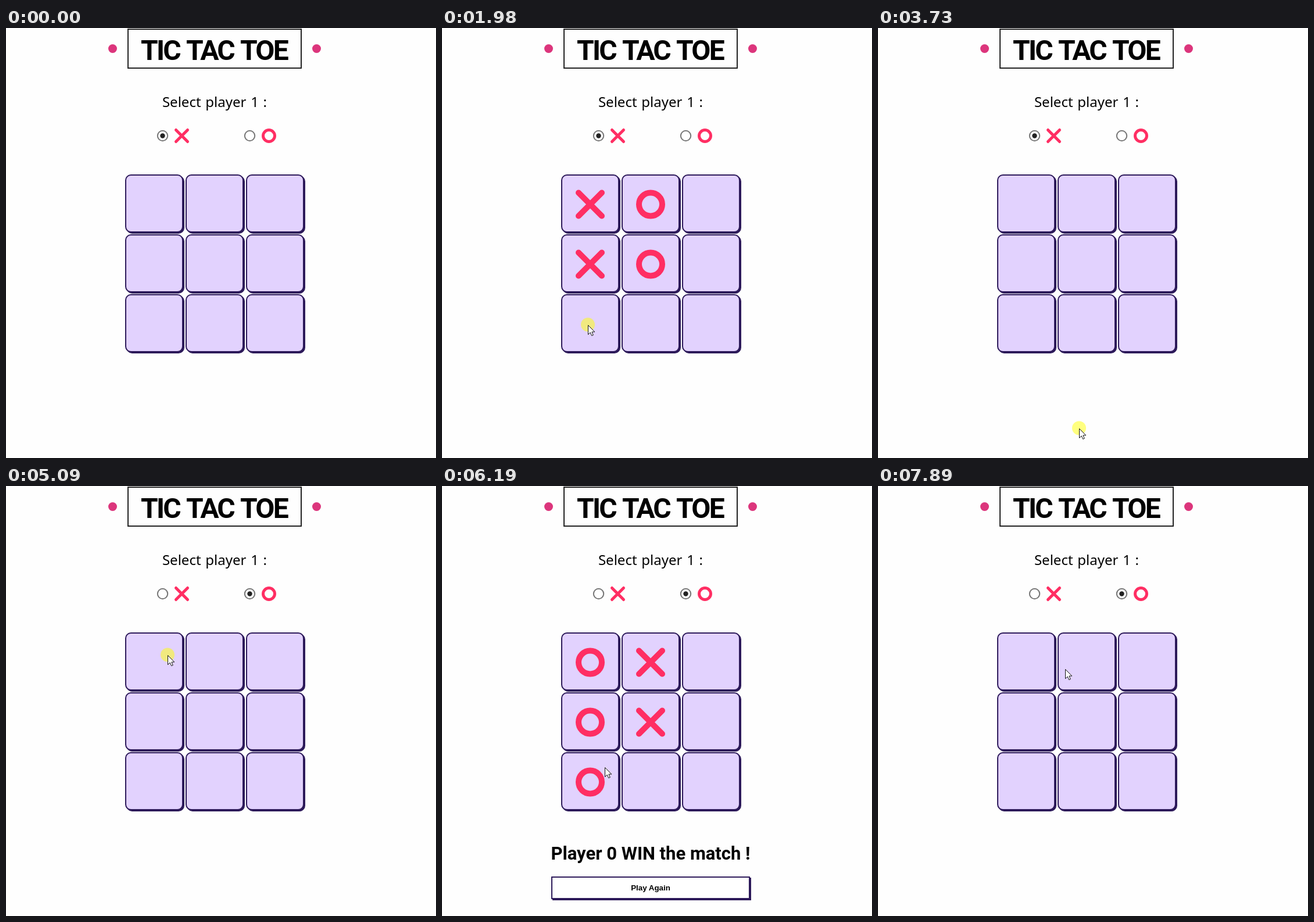
These frames come from a looping animation (740 px wide and 740 px high, 8 s). An HTML page:

```html
<!DOCTYPE html>
<html lang="en">
<head>
<meta charset="utf-8">
<title>Tic Tac Toe</title>
<style>
  html, body { margin: 0; height: 100%; overflow: hidden; background: #fefefe; }
  svg { display: block; width: 100vw; height: 100vh; }
  text { text-anchor: middle; }
  .title { font: 700 48px Roboto, sans-serif; letter-spacing: -2.8px; word-spacing: 3.5px; }
  .prompt { font: 500 24px "Noto Sans", sans-serif; word-spacing: 1.5px; }
  .result { font: 700 31px Roboto, sans-serif; }
  .again { font: 700 13.333px "Liberation Sans", Arial, sans-serif; }
  .mark { fill: none; stroke: #ff2e63; stroke-width: 10; stroke-linecap: round; }
  .cell, .shade, .button { stroke: #2d1a5a; stroke-width: 2; }
  .cell, .button.hover { fill: #e2d2fe; }
  .shade { fill: #2d1a5a; }
  .button { fill: #fff; }
  .radio { fill: #fff; stroke: #767676; stroke-width: 2; }
</style>
</head>
<body>
<svg viewBox="0 0 740 740">
  <defs>
    <path id="X" class="mark" d="M-20-20 20 20M20-20-20 20"/>
    <circle id="O" class="mark" r="20"/>
    <g id="tile">
      <rect class="shade" x="3" y="3" width="98" height="98" rx="9"/>
      <rect class="cell" x="1" y="1" width="98" height="98" rx="9"/>
    </g>
  </defs>

  <rect x="210" y="2" width="298" height="67" fill="none" stroke="#222" stroke-width="2"/>
  <g fill="#dc357c">
    <circle cx="183.5" cy="35.5" r="7.5"/>
    <circle cx="534.5" cy="35.5" r="7.5"/>
  </g>
  <text class="title" x="358" y="55">TIC TAC TOE</text>
  <text class="prompt" x="359" y="136">Select player 1 :</text>

  <circle class="radio" cx="269.5" cy="185.5" r="8.7"/>
  <circle class="radio" cx="419.5" cy="185.5" r="8.7"/>
  <circle id="choice" cy="185.5" r="4.2" fill="#222"/>
  <use href="#X" transform="translate(302.5 185.5) scale(.5)"/>
  <use href="#O" transform="translate(452.5 185.5) scale(.5)"/>

  <g id="board"></g>

  <g id="outcome">
    <text id="result" class="result" x="359" y="643"></text>
    <rect class="shade" x="191" y="675" width="340" height="37"/>
    <rect id="button" class="button" x="189" y="673" width="340" height="37"/>
    <text class="again" x="359" y="696">Play Again</text>
  </g>

  <g id="cursor">
    <circle id="press" cy="-.5" r="12" fill="#ff0" fill-opacity=".5"/>
    <path d="M.5.5V16.5L4.2 13 6.7 18.5 9.3 17.4 6.9 12H11.8Z" fill="#fff" stroke="#111"/>
  </g>
</svg>
<script>
  const LOOP = 8000, ENTER = 70, PRESS = 70;
  const $ = id => document.getElementById(id);
  const show = (el, on) => el.setAttribute("visibility", on ? "visible" : "hidden");
  const mix = (a, b, p) => a + (b - a) * p;
  const smooth = p => p * p * (3 - 2 * p);
  const easeOut = p => 1 - (1 - p) ** 3;

  const board = $("board");
  function place(shape, col, row, dx = 0, dy = dx) {
    const el = document.createElementNS("http://www.w3.org/2000/svg", "use");
    el.setAttribute("href", "#" + shape);
    el.setAttribute("transform", `translate(${205 + col * 104 + dx} ${252 + row * 103 + dy})`);
    return board.appendChild(el);
  }
  for (let i = 0; i < 9; i++) place("tile", i % 3, Math.floor(i / 3));

  const stops = [], clicks = [], marks = [];

  function rest(from, to, x, y) {
    stops.push({ from, to, x, y });
  }
  function click(t, x, y) {
    clicks.push(t);
    rest(t, t + PRESS, x, y);
  }

  // Five moves at an even pace zigzag down the first two columns
  function play({ players, top, bottom, reach, start, win, reset }) {
    for (let i = 0; i < 5; i++) {
      const col = i % 2, row = (i - col) / 2;
      const from = mix(start, win, i / 4);
      click(from - PRESS,
        mix(top[0], bottom[0], row / 2) + col * reach[0],
        mix(top[1], bottom[1], row / 2) + col * reach[1]);
      marks.push({ from, to: reset, el: place(players[col], col, row, 50, 51.5) });
    }
  }

  const games = [
    { players: "XO", winner: 1, top: [262, 300], bottom: [251, 511], reach: [88, 8],
      start: 810, win: 2050, reset: 3730 },
    { players: "OX", winner: 0, top: [278, 291], bottom: [280, 483], reach: [67, 18],
      start: 5160, win: 6190, reset: 7070 }
  ];
  const switchTime = 4540;

  rest(ENTER, ENTER, 655, 732);
  play(games[0]);
  rest(2190, 2460, 300, 603);
  rest(2730, games[0].reset, 346, 689);
  click(games[0].reset, 346, 689);
  click(switchTime, 418, 187);
  play(games[1]);
  rest(6810, games[1].reset, 340, 689);
  click(games[1].reset, 340, 689);
  rest(7480, 7680, 281, 194);
  rest(7890, LOOP, 322, 315);

  function cursorAt(t) {
    const i = Math.max(0, stops.findIndex(s => t <= s.to));
    const b = stops[i], a = stops[i - 1] || b;
    if (t >= b.from || a === b) return [b.x, b.y];
    const p = (t - a.to) / (b.from - a.to);
    return [mix(a.x, b.x, smooth(p)), mix(a.y, b.y, easeOut(p))];
  }

  function draw(t) {
    const [x, y] = cursorAt(t);
    $("cursor").setAttribute("transform", `translate(${Math.round(x)} ${Math.round(y)})`);
    $("cursor").setAttribute("display", t < ENTER ? "none" : "inline");
    show($("press"), clicks.some(c => t >= c && t < c + PRESS));
    $("choice").setAttribute("cx", t < switchTime + PRESS ? 269.5 : 419.5);
    marks.forEach(m => show(m.el, t >= m.from && t < m.to));

    const won = games.find(g => t >= g.win && t < g.reset);
    show($("outcome"), won);
    if (won) $("result").textContent = `Player ${won.winner} WIN the match !`;
    $("button").classList.toggle("hover", y > 672);
  }

  const began = performance.now();
  function tick() {
    draw((performance.now() - began) % LOOP);
    requestAnimationFrame(tick);
  }
  tick();
</script>
</body>
</html>
```
